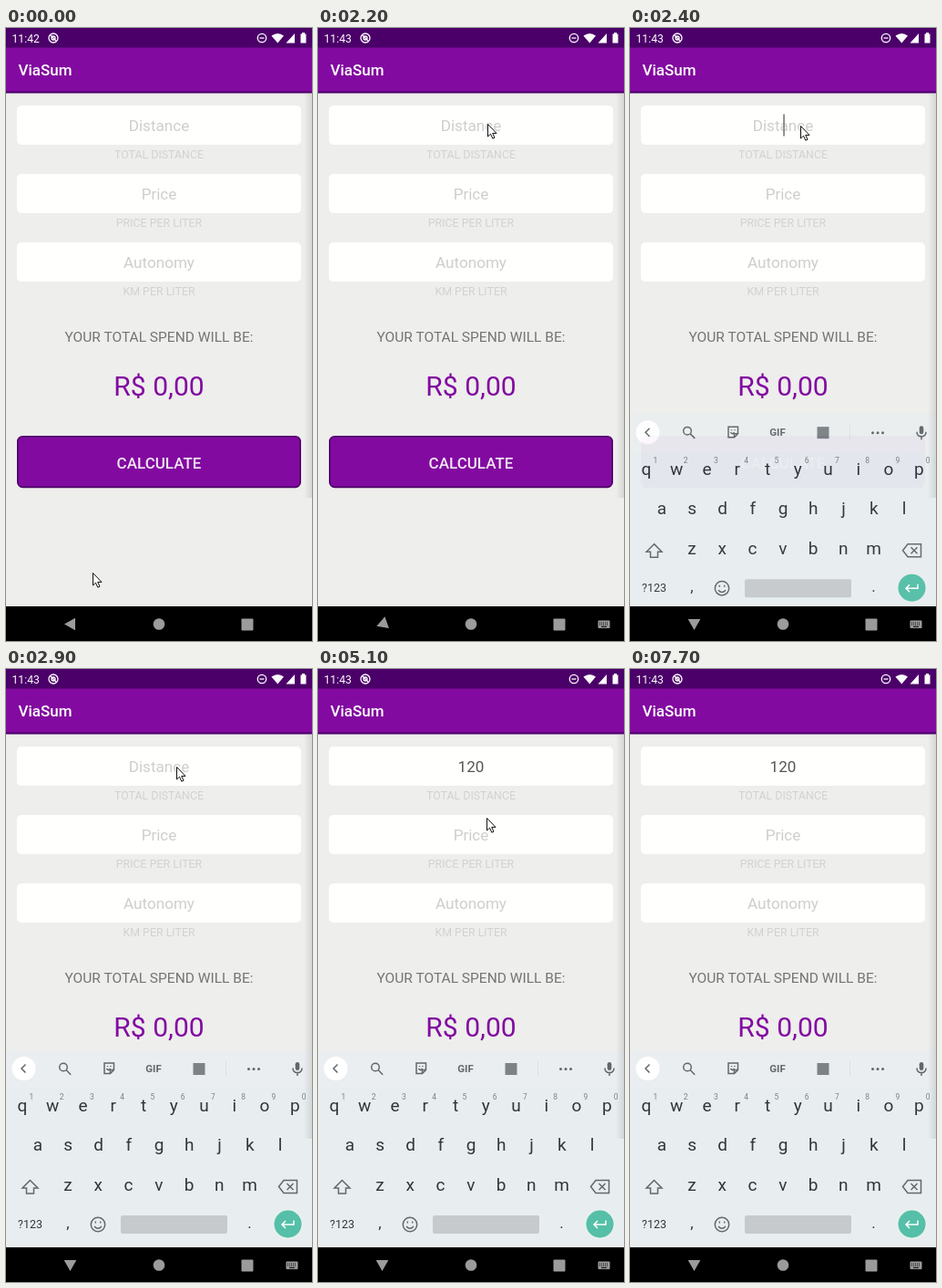
These frames come from a looping animation (336 by 672 pixels, 8000 ms). An HTML page:

```html
<!DOCTYPE html>
<html lang="en">
<head>
<meta charset="utf-8">
<title>Trip cost</title>
<style>
  html, body { margin: 0; width: 100%; height: 100%; overflow: hidden; background: #eeeeec; }
  svg { display: block; width: 100vw; height: 100vh; font-family: Roboto, sans-serif; }
  .line { fill: none; stroke: #62676b; stroke-width: 1.5; }
  .key { font-size: 19px; fill: #30363a; }
  .hint { font-size: 8.5px; fill: #7b8185; }
</style>
</head>
<body>
<svg viewBox="0 0 336 672">
  <defs>
    <linearGradient id="edge">
      <stop offset="0" stop-color="#777" stop-opacity="0"/>
      <stop offset="1" stop-color="#777" stop-opacity=".2"/>
    </linearGradient>
  </defs>
  <rect width="336" height="672" fill="#eeeeec"/>

  <g id="page" text-anchor="middle">
    <text x="168" y="344" font-size="15.5" fill="#747474">YOUR TOTAL SPEND WILL BE:</text>
    <text x="168" y="403" font-size="30" fill="#820aa0">R$ 0,00</text>
    <rect x="12.8" y="447.8" width="310.4" height="55.6" rx="5.5" fill="#820aa0" stroke="#4b0069" stroke-width="1.6"/>
    <text x="168" y="482.5" font-size="17" font-weight="500" fill="#f3e8f5">CALCULATE</text>
  </g>
  <rect id="caret" y="94.5" width="1.7" height="24" fill="#808080"/>

  <g id="board">
    <rect y="418" width="336" height="222" fill="#e8eef0"/>
    <rect y="418" width="336" height="41" fill="#ebeef0"/>
    <circle cx="19.5" cy="438" r="13" fill="#fff"/>
    <path class="line" d="M21.5 433.5l-4.5 4.5 4.5 4.5"/>
    <circle class="line" cx="63" cy="436.5" r="4.3"/>
    <path class="line" d="M66.2 439.7l5 5M108 432h10.500v7.500l-4 4h-6.500zM118.500 439.500h-4v4M110.500 438q2 3 4 0M111.500 435v1M115 435v1"/>
    <text x="162" y="442.300" font-size="11.500" font-weight="700" fill="#62676b" text-anchor="middle">GIF</text>
    <rect x="205.500" y="432" width="13" height="13" fill="#7d8285"/>
    <path d="M241.500 430v16" stroke="#dde1e3"/>
    <g fill="#62676b">
      <circle cx="266.500" cy="438.500" r="1.500"/><circle cx="272" cy="438.500" r="1.500"/><circle cx="277.500" cy="438.500" r="1.500"/>
      <rect x="317.700" y="431" width="4.600" height="9" rx="2.300"/>
    </g>
    <path class="line" d="M315 437.500q0 5 5 5t5-5M320 442.500v3.500"/>
    <g id="keys" text-anchor="middle"></g>
    <path class="line" d="M26.500 560.500l-8.500 8.500h4.500v6h8v-6h4.500z"/>
    <path class="line" d="M299.500 567.500l5.500-7h14.500v14h-14.500zM308.500 564l7 7M315.500 564l-7 7"/>
    <g text-anchor="middle" fill="#30363a">
      <text x="26.500" y="613" font-size="12.500">?123</text>
      <text x="68" y="613" font-size="17">,</text>
      <text x="267.500" y="613" font-size="17">.</text>
    </g>
    <circle class="line" cx="101" cy="609" r="7.700"/>
    <path class="line" d="M97 611q4 4.500 8 0M98.300 605.500v2M103.700 605.500v2"/>
    <rect x="126" y="599" width="117" height="20" rx="2" fill="#c6cacc"/>
    <circle cx="309.500" cy="608.500" r="15" fill="#55bfa7"/>
    <path class="line" style="stroke:#fff" d="M316 604.500v4.500h-13M307 605l-4 4 4 4"/>
  </g>

  <rect x="327" y="72" width="9" height="443" fill="url(#edge)"/>
  <rect width="336" height="22" fill="#4b0069"/>
  <rect y="21.500" width="336" height="48.500" fill="#820aa0"/>
  <rect y="69.500" width="336" height="2" fill="#4b0069"/>
  <text x="13.500" y="52.300" font-size="17" font-weight="500" fill="#fff">ViaSum</text>
  <g fill="#fff">
    <text id="clock" x="6.500" y="15.500" font-size="12.200"></text>
    <path d="M291.500 8.500q7-5 13.500 0l-6.700 8zM317 6v10.500h-9.500zM323.500 6.500h1.500v-1.500h3v1.500h1.500v10h-6z"/>
  </g>
  <g fill="none" stroke="#fff" stroke-width="1.300">
    <circle cx="52" cy="11" r="5"/><circle cx="52" cy="11" r="2"/><path d="M49 8l6 6"/>
    <circle cx="281" cy="11" r="4.700"/><path d="M278.500 11h5"/>
  </g>

  <rect y="634" width="336" height="38" fill="#000"/>
  <g fill="#9b9b9b">
    <path id="back" d="M64 653.500l12-6.800v13.600z"/>
    <circle cx="168" cy="653.500" r="6.300"/>
    <rect x="258.500" y="647.500" width="13" height="13" rx="1"/>
    <g id="toggle">
      <rect x="307.500" y="649.500" width="13" height="8.500" rx="1"/>
      <path d="M309 652h10M309 654h10" stroke="#000" stroke-dasharray="1 1"/>
      <path d="M311 656.300h6" stroke="#000"/>
    </g>
  </g>
  <path id="pointer" d="M.5.5v13.500l3-2.800 2.300 5 2.200-1-2.300-4.800h4.300z" fill="#fff" stroke="#111"/>
</svg>
<script>
const $ = id => document.getElementById(id);
const NS = "http://www.w3.org/2000/svg";
const LOOP = 8000, STEP = 100;

function add(parent, tag, attrs, text = "") {
  const el = document.createElementNS(NS, tag);
  for (const k in attrs) el.setAttribute(k, attrs[k]);
  el.textContent = text;
  parent.appendChild(el);
  return el;
}

const inputs = [["Distance", "TOTAL DISTANCE"], ["Price", "PRICE PER LITER"], ["Autonomy", "KM PER LITER"]]
  .map(([name, label], i) => {
    const y = 85 + 75 * i;
    add($("page"), "rect", { x: 12, y, width: 312, height: 43, rx: 5, fill: "#fffffd" });
    add($("page"), "text", { x: 168, y: y + 58.3, "font-size": 12.4, fill: "#d2d2d0" }, label);
    return add($("page"), "text", { x: 168, y: y + 28.2, "font-size": 17.1, fill: "#cecece" }, name);
  });

["qwertyuiop", "asdfghjkl", "zxcvbnm"].forEach((row, r) => {
  [...row].forEach((ch, i) => {
    const x = [18, 35, 68][r] + 33.25 * i;
    add($("keys"), "text", { x, y: [485, 528, 572][r], class: "key" }, ch);
    if (!r) add($("keys"), "text", { x: x + 10, y: 472, class: "hint" }, (i + 1) % 10);
  });
});

// time, x, y of the pointer tip
const path = [[0, 95, 597], [700, 95, 597], [1200, 167, 142], [1600, 181, 108], [1900, 186, 105],
  [2200, 186, 105], [2300, 187, 107], [3000, 187, 107], [3500, 185, 163], [5500, 185, 163], [5900, 268, 470]];

// times at which the caret appears or vanishes
const blinks = [2300, 2800, 3300, 3800, 4000, 5100, 5600, 6100, 6300, 6800, 7200, 7700];

const clamp = v => Math.max(0, Math.min(1, v));

function pointerAt(t) {
  const i = path.findIndex(p => p[0] > t);
  if (i < 0) return null;
  const [a, b] = [path[i - 1], path[i]];
  const k = (t - a[0]) / (b[0] - a[0]);
  return [1, 2].map(n => a[n] + (b[n] - a[n]) * k);
}

function draw(t) {
  $("clock").textContent = t < 200 ? "11:42" : "11:43";

  const typed = "120".slice(0, [4000, 4300, 4600].filter(s => t >= s).length);
  inputs[0].textContent = typed || "Distance";
  inputs[0].setAttribute("fill", typed ? "#555" : "#cecece");
  $("caret").setAttribute("x", 168.2 + typed.length * 4.8);
  $("caret").setAttribute("opacity", blinks.filter(b => t >= b).length % 2);

  const p = clamp((t - 2200) / 300);
  $("board").setAttribute("transform", `translate(0 ${140 * (1 - p) ** 3})`);
  $("board").setAttribute("opacity", clamp(p * 1.45));
  $("back").setAttribute("transform", `rotate(${-90 * clamp((t - 2150) / 230)} 70.5 653.5)`);
  $("toggle").setAttribute("opacity", t >= 2200 ? 1 : 0);

  const at = pointerAt(t);
  $("pointer").setAttribute("opacity", at ? 1 : 0);
  if (at) $("pointer").setAttribute("transform", `translate(${at})`);
}

const start = performance.now();
function tick() {
  const t = (performance.now() - start) % LOOP;
  draw(Math.floor(t / STEP) * STEP);
  requestAnimationFrame(tick);
}
tick();
</script>
</body>
</html>
```
